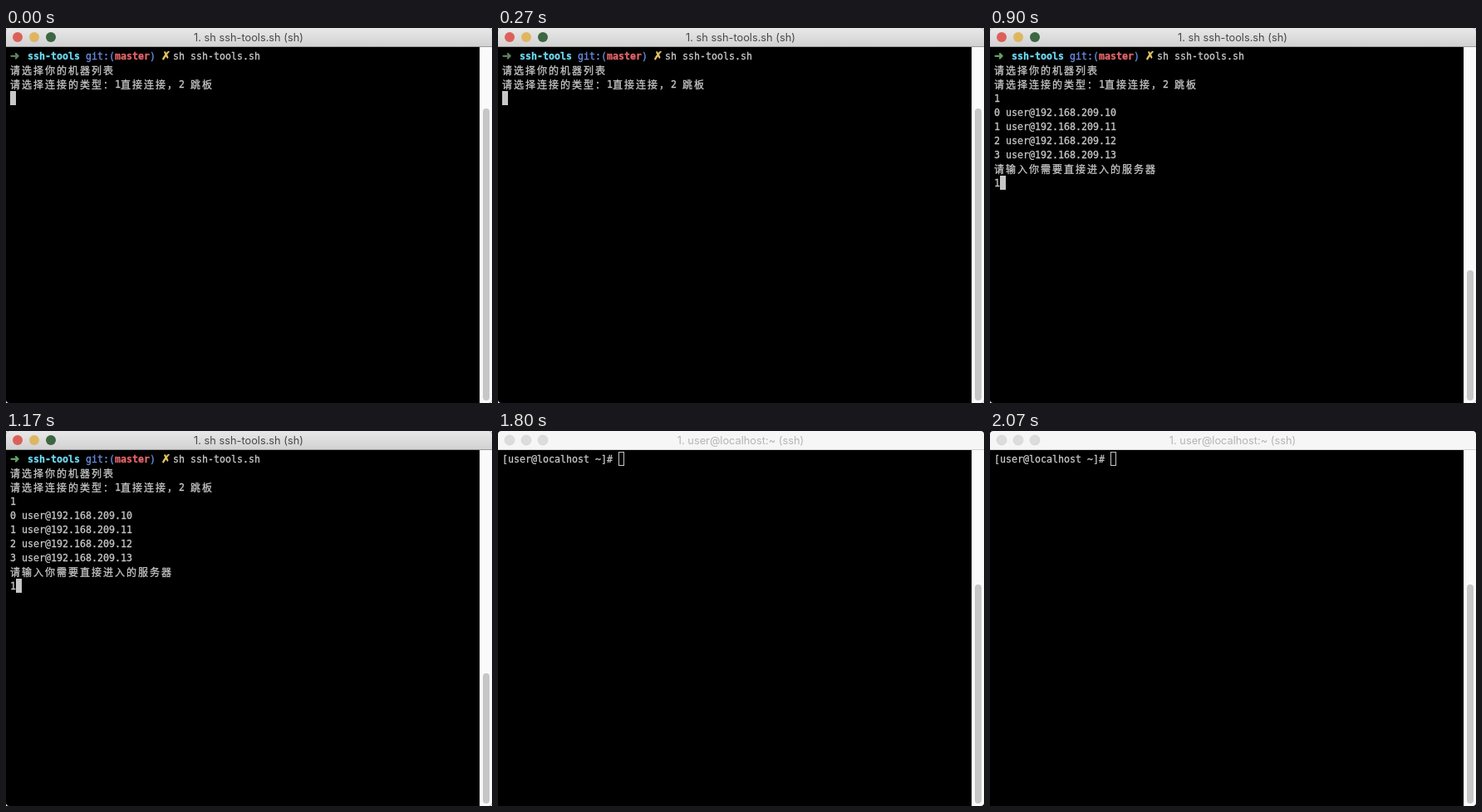
An HTML page for the animation above (2.25 s loop, 585 px wide and 452 px high).

```html
<!DOCTYPE html>
<html lang="zh-CN">
<head>
<meta charset="utf-8">
<title>Terminal</title>
<style>
html, body { margin: 0; width: 100%; height: 100%; overflow: hidden; background: #000; }
svg { display: block; color: #c7c7c7; }
text { white-space: pre; fill: currentColor; stroke: currentColor; stroke-width: .3px; }
.mono { font: 11.63px "DejaVu Sans Mono", monospace; }
.cjk { font: 12px "Noto Sans CJK SC", "Noto Sans CJK", sans-serif; letter-spacing: 2px; transform: translateY(.5px); }
.symbol { font: bold 13.5px "DejaVu Sans", sans-serif; stroke-width: .6px; }
.title { font: 12.8px Inter, sans-serif; text-anchor: middle; stroke: none; }
.bold { font-weight: bold; }
</style>
</head>
<body>
<svg id="stage" width="585" height="452" viewBox="0 0 585 452">
  <defs>
    <linearGradient id="bar" x2="0" y2="1">
      <stop stop-color="#e8e8e8"/>
      <stop offset="1" stop-color="#d1d1d1"/>
    </linearGradient>
  </defs>
</svg>
<script>
const STEP = 450, STEPS = 5;
const CELL = 7, LINE = 17, LEFT = 5, TOP = 25;
const stage = document.getElementById('stage');

function add(parent, tag, attrs, content = '') {
  const el = document.createElementNS('http://www.w3.org/2000/svg', tag);
  for (const key in attrs) el.setAttribute(key, attrs[key]);
  el.textContent = content;
  parent.append(el);
  return el;
}

// A group that is visible from step `from` up to step `to`.
function scene(from, to) {
  const group = add(stage, 'g', {});
  const key = (step, opacity) => ({ offset: step / STEPS, opacity, easing: 'steps(1, end)' });
  const frames = [key(0, from === 0 ? 1 : 0)];
  if (from > 0) frames.push(key(from, 1));
  if (to < STEPS) frames.push(key(to, 0));
  frames.push(key(STEPS, to === STEPS ? 1 : 0));
  group.animate(frames, { duration: STEP * STEPS, iterations: Infinity });
  return group;
}

// Writes on the character grid; wide characters take two cells.
function write(parent, row, col, string, color, style = '') {
  for (const run of string.match(/[\x00-\xff]+|[^\x00-\xff]+/g)) {
    const wide = run.charCodeAt(0) > 255;
    const font = style === 'symbol' ? '' : wide ? 'cjk' : 'mono';
    const el = add(parent, 'text', {
      x: LEFT + col * CELL, y: TOP + row * LINE + 13, class: `${font} ${style}`
    }, run);
    if (color) el.style.color = color;
    col += run.length * (wide ? 2 : 1);
  }
}

function cursor(parent, row, col) {
  add(parent, 'rect', {
    x: LEFT + col * CELL, y: TOP + row * LINE, width: CELL, height: LINE, fill: '#c7c7c7'
  });
}

function frame(from, to, { title, backdrop, bar, edge, ink, lights, rim }) {
  const g = scene(from, to);
  add(g, 'rect', { width: 585, height: 452, fill: backdrop });
  add(g, 'rect', { width: 585, height: 452, rx: 4 });
  add(g, 'path', { d: 'M570 23H585V448Q585 452 581 452H570Z', fill: '#fafafa' });
  add(g, 'rect', { x: 570, y: 23, width: 1, height: 429, fill: '#e6e6e6' });
  add(g, 'path', { d: 'M0 23V4Q0 0 4 0H581Q585 0 585 4V23Z', fill: bar });
  add(g, 'rect', { y: 22, width: 585, height: 1, fill: edge });
  lights.forEach((fill, i) => add(g, 'circle', {
    cx: 14 + i * 20, cy: 11, r: 6, fill, stroke: rim, 'stroke-width': .5
  }));
  add(g, 'text', { x: 292, y: 16, class: 'title' }, title).style.color = ink;
}

function thumb(from, to, y) {
  add(scene(from, to), 'rect', {
    x: 574, y, width: 8, height: 449 - y, rx: 4, fill: '#c7c7c7'
  });
}

frame(0, 4, {
  title: '1. sh ssh-tools.sh (sh)', backdrop: '#fff', bar: 'url(#bar)',
  edge: '#9a9a9a', ink: '#484848', lights: ['#dc605a', '#dfb660', '#3c6642'], rim: 'none'
});
frame(4, 5, {
  title: '1. user@localhost:~ (ssh)', backdrop: '#000', bar: '#f6f6f6',
  edge: '#d2d2d2', ink: '#b4b4b4', lights: Array(3).fill('#dcdcdc'), rim: '#c8c8c8'
});

thumb(0, 1, 97);
thumb(1, 4, 292);
thumb(4, 5, 185);

const prompt = scene(0, 4);
write(prompt, 0, 3, 'ssh-tools', '#6fdcf5', 'bold');
write(prompt, 0, 13, 'git:(', '#6c8fe6');
write(prompt, 0, 18, 'master', '#e6656a', 'bold');
write(prompt, 0, 24, ')', '#6c8fe6');
write(prompt, 0, 26, '✗', '#e8c866', 'symbol');
write(prompt, 0, 28, 'sh ssh-tools.sh');
write(prompt, 1, 0, '请选择你的机器列表');
write(prompt, 2, 0, '请选择连接的类型：1直接连接，2 跳板');

const waiting = scene(0, 1);
write(waiting, 0, 0, '➜', '#638463', 'symbol');
cursor(waiting, 3, 0);

const list = scene(1, 4);
write(list, 0, 0, '➜', '#68a56c', 'symbol');
write(list, 3, 0, '1');
for (let i = 0; i < 4; i++) write(list, 4 + i, 0, `${i} user@192.168.209.1${i}`);
write(list, 8, 0, '请输入你需要直接进入的服务器');

cursor(scene(1, 2), 9, 0);
write(scene(2, 4), 9, 0, '1');
cursor(scene(2, 3), 9, 1);

const connecting = scene(3, 4);
write(connecting, 10, 0, '正在连接服务器');
write(connecting, 10, 15, 'user@192.168.209.11');
write(connecting, 11, 0, 'spawn ssh user@192.168.209.11');
cursor(connecting, 12, 0);

const remote = scene(4, 5);
write(remote, 0, 0, '[user@localhost ~]#');
add(remote, 'rect', {
  x: 145.5, y: 25.5, width: 6, height: 16, fill: 'none', stroke: '#c7c7c7'
});
</script>
</body>
</html>
```
